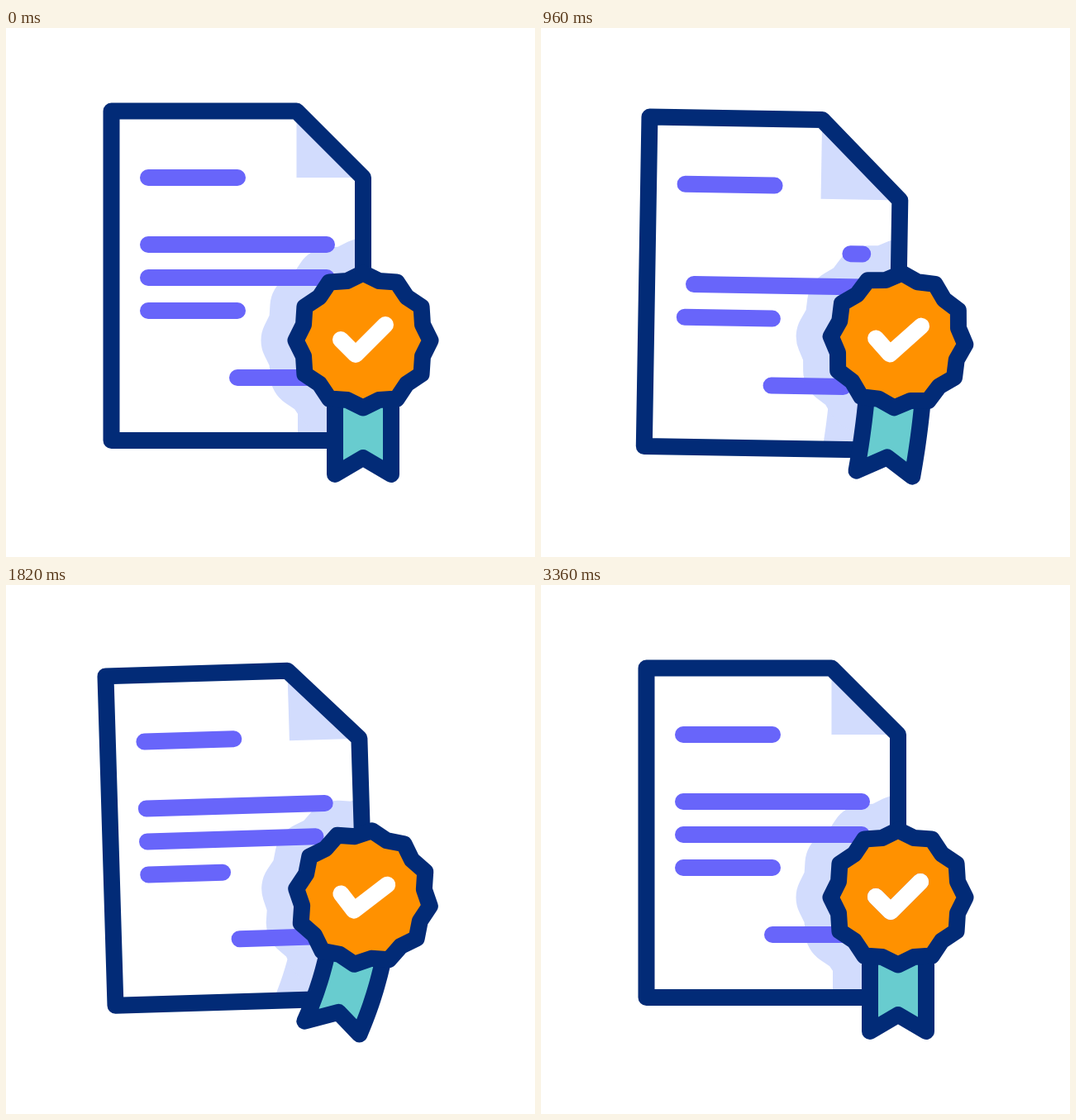
Animation, 640 px wide and 640 px high, one loop 3680 ms. Source, as an HTML page with a canvas:

```html
<!DOCTYPE html>
<html lang="en">
<head>
<meta charset="utf-8">
<title>Certificate</title>
<style>
  html, body { margin: 0; width: 100%; height: 100%; overflow: hidden; background: #fff; }
  canvas { display: block; width: 640px; height: 640px; }
</style>
</head>
<body>
<canvas id="stage" width="640" height="640"></canvas>
<script>
const ctx = document.getElementById('stage').getContext('2d');
const LOOP = 3680, WIPE = 480;
const NAVY = '#022b77', VIOLET = '#6865fa', ORANGE = '#ff9100', TEAL = '#68cccf', PALE = '#d2dcfd';
const rad = deg => deg * Math.PI / 180;

function ramp(t, start, duration) {
  const u = Math.min(1, Math.max(0, (t - start) / duration));
  return (1 - Math.cos(Math.PI * u)) / 2;
}

// Ease from one extreme to the next, starting and ending at rest.
function sway(t, beats, extremes) {
  return extremes.reduce((value, extreme, i) =>
    value + (extreme - (extremes[i - 1] || 0)) * ramp(t, beats[i], beats[i + 1] - beats[i]), 0);
}

function pose(t) {
  const sheetBeats = [0, 420, 800, 1120, 1700, 2200];
  const badgeBeats = [700, 1500, 2350, 2700, 3360];
  return {
    tilt: sway(t, sheetBeats, [6, -2.35, 4.2, -2, 0]),
    bob: sway(t, sheetBeats, [0, 35, -16, 6.7, 0]),
    fold: 80.5 + sway(t, sheetBeats, [4.6, 40, -9, 4.6, 0]),
    spin: sway(t, badgeBeats, [14, -7, 0, 0]),
    swing: sway(t, badgeBeats, [24.5, -11, 14, 0])
  };
}

function shape(points, closed) {
  const path = new Path2D();
  points.forEach(([x, y]) => path.lineTo(x, y));
  if (closed) path.closePath();
  return path;
}

function paint(path, fill, stroke, width = 20) {
  if (fill) { ctx.fillStyle = fill; ctx.fill(path); }
  if (stroke) { ctx.strokeStyle = stroke; ctx.lineWidth = width; ctx.stroke(path); }
}

const polar = (r, a) => [r * Math.cos(a), r * Math.sin(a)];
const seal = shape(Array.from({ length: 24 }, (_, i) => polar(i % 2 ? 74.5 : 81.5, rad(15 * i))), true);
const check = shape([[-27, -1], [-9, 17], [27, -19]]);
const checkLength = 54 * Math.SQRT2;

// The ribbon bends: its turn grows from the seal towards the tips.
function ribbon({ spin, swing }) {
  const left = [], right = [];
  for (let y = 60; y <= 162; y += 6) {
    left.push([-34, y]);
    right.unshift([34, y]);
  }
  return shape([...left, [0, 142], ...right].map(([x, y]) => {
    const bend = Math.max(0, (y - 70) / 92);
    return polar(Math.hypot(x, y), Math.atan2(y, x) + rad(spin + (swing - spin) * bend));
  }));
}

function onSheet({ tilt, bob }, draw) {
  ctx.save();
  ctx.translate(260, 336 + bob);
  ctx.rotate(rad(tilt));
  ctx.translate(-260, -336);
  draw();
  ctx.restore();
}

function onBadge(spin, draw) {
  ctx.save();
  ctx.translate(432, 378);
  ctx.rotate(rad(spin));
  draw();
  ctx.restore();
}

function bar(x, y, length, t, eraseAt, drawAt) {
  const drawn = eraseAt ? ramp(t, drawAt, WIPE) : 0;
  const from = eraseAt && !drawn ? ramp(t, eraseAt, WIPE) : 0;
  const to = drawn || 1;
  if (from < to) paint(shape([[x + length * from, y], [x + length * to, y]]), null, VIOLET);
}

function traceCheck(part, colour) {
  if (!part) return;
  ctx.setLineDash([part * checkLength, 2 * checkLength]);
  paint(check, null, colour);
  ctx.setLineDash([]);
}

function drawSheet(t, now, band) {
  const x = 432 - now.fold, y = 100.5 + now.fold;
  const sheet = shape([[127.5, 100.5], [x, 100.5], [432, y], [432, 499], [127.5, 499]], true);
  onSheet(now, () => {
    paint(sheet, '#fff');
    paint(shape([[x, 100.5], [x, y], [432, y]]), PALE);
    ctx.clip(sheet);
    ctx.setTransform(1, 0, 0, 1, 0, 0);
    onBadge(0, () => paint(band, PALE, PALE, 90));
    onBadge(now.spin, () => paint(seal, PALE, PALE, 84));
  });
  onSheet(now, () => {
    bar(172, 181, 108);
    bar(172, 262, 216, t, 562, 1187);
    bar(172, 302, 216, t, 887, 1415);
    bar(172, 342, 108, t, 920, 1470);
    bar(280, 423, 87);
    paint(sheet, null, NAVY);
  });
}

function render(t) {
  const now = pose(t), band = ribbon(now);
  ctx.fillStyle = '#fff';
  ctx.fillRect(0, 0, 640, 640);
  ctx.lineCap = ctx.lineJoin = 'round';
  drawSheet(t, now, band);
  onBadge(0, () => paint(band, TEAL, NAVY));
  onBadge(now.spin, () => {
    paint(seal, ORANGE, NAVY);
    traceCheck(1, '#fff');
    traceCheck(ramp(t, 2050, WIPE), VIOLET);
    traceCheck(ramp(t, 2640, WIPE), '#fff');
    if (t > 2640 + WIPE) traceCheck(1, '#fff');
  });
}

function frame() {
  render(performance.now() % LOOP);
  requestAnimationFrame(frame);
}
frame();
</script>
</body>
</html>
```
